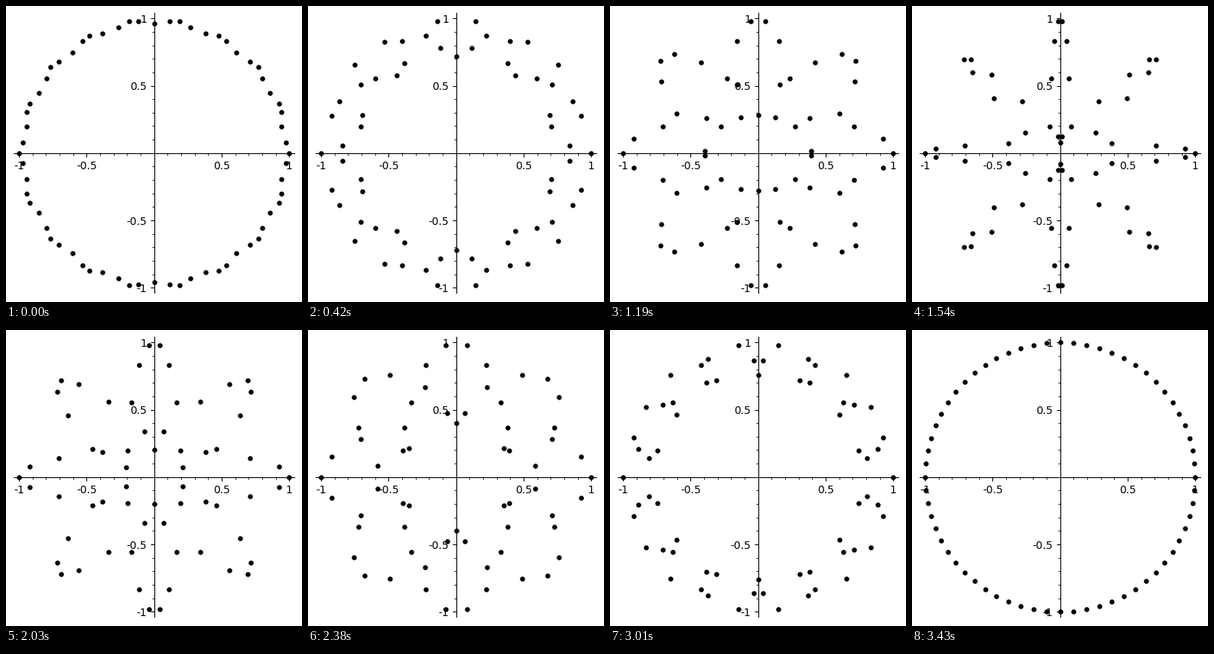
Write a matplotlib script that moves like this. It is 387x388 px and loops after 3500 ms.

```python
import numpy as np
import matplotlib.pyplot as plt
from matplotlib.animation import FuncAnimation
from matplotlib.ticker import FixedLocator, FuncFormatter, MultipleLocator

WIDTH, HEIGHT, DPI = 387, 388, 100
CENTER_X, CENTER_Y, UNIT = 193.72, 192.8, 176.6  # pixels, y measured from the top
LIMIT = 1.04
FRAMES, INTERVAL = 50, 70
ANGLES = 2 * np.pi * np.arange(64) / 64

plt.rcParams["font.family"] = "DejaVu Sans"


def make_axes(fig):
    half = LIMIT * UNIT
    ax = fig.add_axes([(CENTER_X - half) / WIDTH,
                       (HEIGHT - CENTER_Y - half) / HEIGHT,
                       2 * half / WIDTH, 2 * half / HEIGHT])
    ax.set(xlim=(-LIMIT, LIMIT), ylim=(-LIMIT, LIMIT))
    for side in ("left", "bottom"):
        ax.spines[side].set_position(("data", 0))
    for side in ("right", "top"):
        ax.spines[side].set_visible(False)
    for axis in (ax.xaxis, ax.yaxis):
        axis.set_major_locator(FixedLocator([-1, -0.5, 0.5, 1]))
        axis.set_major_formatter(FuncFormatter(lambda value, _: f"{value:g}"))
        axis.set_minor_locator(MultipleLocator(0.1))
    return ax


def positions(squash):
    """Blend two opposite rotations: each dot follows a squashing ellipse."""
    z = ((1 + squash) * np.exp(1j * ANGLES)
         + (1 - squash) * np.exp(-17j * ANGLES)) / 2
    return np.column_stack([z.real, z.imag])


fig = plt.figure(figsize=(WIDTH / DPI, HEIGHT / DPI), dpi=DPI, facecolor="white")
ax = make_axes(fig)
dots = ax.scatter(*positions(0.96).T, s=10, color="black", linewidths=1.5, zorder=5)


def update(frame):
    dots.set_offsets(positions(0.96 - 0.04 * frame))
    return (dots,)


animation = FuncAnimation(fig, update, frames=FRAMES, interval=INTERVAL,
                          repeat=True, repeat_delay=0)
plt.show()
```
